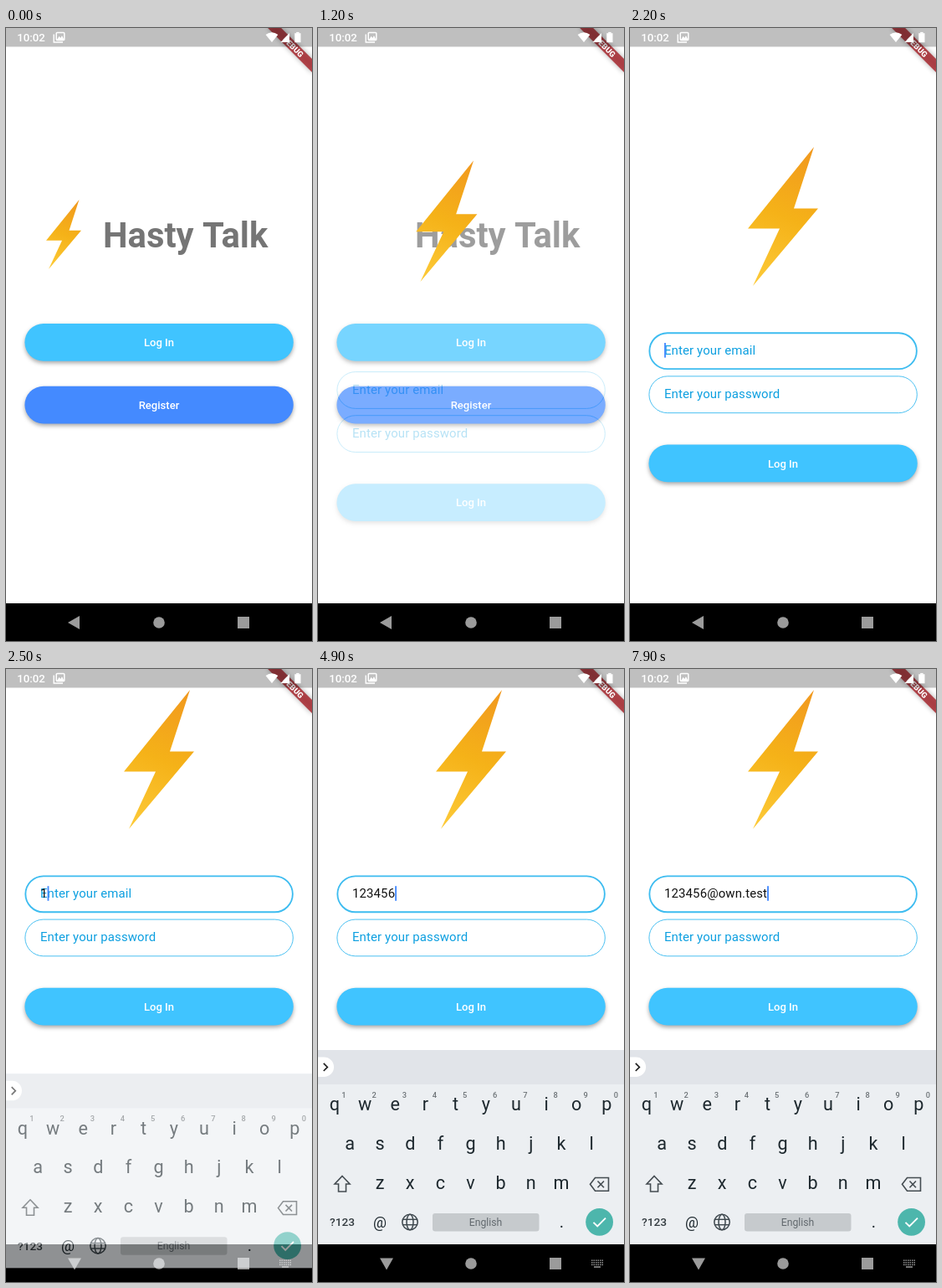
Animation of 366 by 732 pixels, one loop 8 s. Source, as an HTML page with a canvas:

```html
<!DOCTYPE html>
<html lang="en">
<head>
<meta charset="utf-8">
<title>Chat app login</title>
<style>
  html, body { margin: 0; width: 100%; height: 100%; overflow: hidden; background: #fff; }
  canvas { display: block; width: 366px; height: 732px; }
</style>
</head>
<body>
<canvas id="stage"></canvas>
<script>
const W = 366, H = 732, LOOP = 8000;
const SKY = '#40c4ff', BLUE = '#448aff', HINT = '#0c9fe0', GREY = '#9b9b9b', INK = '#1d282e';
const ratio = window.devicePixelRatio || 1;

function prepare(canvas) {
  canvas.width = W * ratio;
  canvas.height = H * ratio;
  const context = canvas.getContext('2d');
  context.scale(ratio, ratio);
  return context;
}
const screen = prepare(document.getElementById('stage'));
const layer = prepare(document.createElement('canvas'));
let g = screen;

// Timeline, in ms
const ROUTE = { start: 1090, length: 233 };
const FOCUS = 2200, RESIZE = 2300;
const KEYBOARD = { start: 2410, length: 150 };
const ADDRESS = '123456@own.test';
// [time, number of characters typed]
const TYPING = [[2500, 1], [2900, 2], [3200, 3], [3700, 4], [4100, 5], [4500, 6], [5300, 7],
  [6400, 8], [6600, 9], [6900, 10], [7300, 11], [7700, 12], [7800, 14], [7900, 15]];
const CARET_OFF = [[5000, 5300], [5850, 6400]];

const clamp = v => Math.max(0, Math.min(1, v));
const progress = (t, span) => clamp((t - span.start) / span.length);
const mix = (a, b, p) => a + (b - a) * p;

function bezier(x1, y1, x2, y2) {
  const at = (a, b, u) => 3 * a * u * (1 - u) ** 2 + 3 * b * u * u * (1 - u) + u ** 3;
  return x => {
    let low = 0, high = 1;
    for (let i = 0; i < 24; i++) {
      const mid = (low + high) / 2;
      if (at(x1, x2, mid) < x) low = mid; else high = mid;
    }
    return at(y1, y2, high);
  };
}
const glide = bezier(.4, 0, .2, 1);
const easeIn = bezier(.42, 0, 1, 1);

function rect(x, y, w, h, color) {
  g.fillStyle = color;
  g.fillRect(x, y, w, h);
}
function round(x, y, w, h, r) {
  g.beginPath();
  g.roundRect(x, y, w, h, r);
}
function disc(x, y, r, color) {
  g.fillStyle = color;
  g.beginPath();
  g.arc(x, y, r, 0, Math.PI * 2);
  g.fill();
}
function trace(points, closed) {
  g.beginPath();
  points.forEach(([x, y]) => g.lineTo(x, y));
  if (closed) g.closePath();
}
function polygon(points, color) {
  trace(points, true);
  g.fillStyle = color;
  g.fill();
}
function stroke(color, width) {
  g.strokeStyle = color;
  g.lineWidth = width;
  g.stroke();
}
function line(points, color, width, closed) {
  trace(points, closed);
  stroke(color, width);
}
function text(label, x, y, size, color, weight = 400, align = 'left', spacing = 0) {
  g.font = `${weight} ${size}px Roboto, sans-serif`;
  g.letterSpacing = spacing + 'px';
  g.textAlign = align;
  g.fillStyle = color;
  g.fillText(label, x, y);
}

// Paints a group on its own layer, then composites it with one opacity.
function group(alpha, dy, paint) {
  if (alpha <= 0) return;
  layer.clearRect(0, 0, W, H);
  g = layer;
  g.save();
  g.translate(0, dy);
  paint();
  g.restore();
  g = screen;
  g.save();
  g.globalAlpha = alpha;
  g.drawImage(layer.canvas, 0, 0, W, H);
  g.restore();
}

function button(label, y, color) {
  g.save();
  g.shadowColor = 'rgba(0,0,0,.34)';
  g.shadowBlur = 5 * ratio;
  g.shadowOffsetY = 2.5 * ratio;
  g.fillStyle = color;
  round(22.4, y, 321.4, 44.7, 22.35);
  g.fill();
  g.restore();
  text(label, 183, y + 27, 13.05, '#fff', 500, 'center');
}

function field(y, focused) {
  const w = focused ? 1.86 : .93;
  round(22.4 + w / 2, y + w / 2, 321.4 - w, 44.7 - w, 22.3);
  stroke('#3dbcf0', w);
}

function bolt(cx, cy, scale) {
  g.save();
  g.translate(cx, cy);
  g.scale(scale, scale);
  const fill = g.createLinearGradient(37, -83, -36, 83);
  fill.addColorStop(0, '#f1981f');
  fill.addColorStop(.5, '#f5b218');
  fill.addColorStop(1, '#fdcb3a');
  polygon([[37, -83], [13, -9.5], [42, -9.5], [-36, 83], [-4, 14.5], [-42, 14.5]], fill);
  g.restore();
}

function welcomePage() {
  rect(0, 0, W, H, '#fff');
  text('Hasty Talk', 116, 261.5, 41.8, '#757575', 700);
  button('Log In', 353, SKY);
  button('Register', 427.7, BLUE);
}

function typed(t) {
  const step = TYPING.filter(([time]) => time <= t).pop();
  return step ? ADDRESS.slice(0, step[1]) : '';
}

function loginPage(t) {
  const top = t >= RESIZE ? 246.5 : 363.3;
  const value = typed(t);
  const focused = t >= FOCUS;
  rect(0, 0, W, H, '#fff');
  field(top, focused);
  field(top + 52.1, false);
  g.globalAlpha = 1 - clamp((t - 2520) / 180);
  text('Enter your email', 41, top + 26.4, 14.93, HINT, 400, 'left', .14);
  g.globalAlpha = 1;
  text('Enter your password', 41, top + 78.5, 14.93, HINT, 400, 'left', .14);
  text(value, 41, top + 26.4, 14.93, '#111', 400, 'left', .14);
  if (focused && !CARET_OFF.some(([from, to]) => t >= from && t < to))
    rect(41 + g.measureText(value).width, top + 12.7, 1.86, 17.6, BLUE);
  button('Log In', top + 134.2, SKY);
}

function banner() {
  g.save();
  g.translate(W, 0);
  g.rotate(Math.PI / 4);
  g.shadowColor = 'rgba(0,0,0,.5)';
  g.shadowBlur = 6 * ratio;
  rect(-37.3, 26.1, 74.6, 11.2, 'rgba(183,28,28,.63)');
  g.shadowColor = 'transparent';
  rect(-37.3, 26.1, 74.6, 11.2, 'rgba(160,45,55,.55)');
  text('DEBUG', 0, 35.1, 9.5, '#fff', 900, 'center');
  g.restore();
}

function statusBar() {
  rect(0, 0, W, 22.4, 'rgba(0,0,0,.25)');
  text('10:02', 13.3, 16.3, 13.2, '#fff', 500);
  line([[57.2, 7.5], [57.2, 17], [68, 17]], '#fff', 1.4);
  round(60.2, 5.6, 9.6, 8.8, 1);
  stroke('#fff', 1.5);
  polygon([[61, 14], [63.6, 9.8], [65.3, 12], [67, 9], [69.5, 14]], '#fff');
  g.fillStyle = '#fff';
  g.beginPath();
  g.moveTo(318, 17);
  g.lineTo(310.6, 8);
  g.quadraticCurveTo(318, 2.5, 325.4, 8);
  g.fill();
  polygon([[328.5, 17], [339, 17], [339, 6]], '#fff');
  rect(345.3, 6.2, 7.2, 11, '#fff');
  rect(347.2, 4.9, 3.4, 1.5, '#fff');
}

function navBar(open) {
  rect(0, 687, W, 45, '#000');
  polygon(open ? [[74, 703.5], [90, 703.5], [82, 717.5]] : [[74, 710], [88, 702], [88, 718]], GREY);
  disc(183, 710, 6.8, GREY);
  rect(277, 703, 14, 14, GREY);
  if (!open) return;
  for (let row = 0; row < 3; row++)
    for (let col = 0; col < 6; col++)
      rect(327 + col * 2.5, 705.5 + row * 2.6, 1.5, 1.4, GREY);
  rect(330, 713.3, 8, 1.5, GREY);
}

function letters(row, x, y) {
  [...row].forEach((key, i) => text(key, x + i * 36.15, y, 21.6, INK, 400, 'center'));
}

function keyboard() {
  rect(0, 455, W, 232, '#eceff2');
  rect(0, 455, W, 41, '#e1e4e9');
  g.fillStyle = '#fff';
  round(-12, 463.5, 31, 23.5, 11.75);
  g.fill();
  line([[6.7, 470.8], [11.3, 475.4], [6.7, 480]], '#222', 1.7);

  letters('qwertyuiop', 20, 527.3);
  letters('asdfghjkl', 38, 573.5);
  letters('zxcvbnm', 74, 620.5);
  [...'1234567890'].forEach((n, i) => text(n, 31 + i * 36.15, 512, 9.3, '#6d7377', 500, 'center'));

  line([[29, 605.5], [38, 615], [33.5, 615], [33.5, 624], [24.5, 624], [24.5, 615], [20, 615]], '#444c51', 1.6, true);
  line([[325.5, 615.3], [331.5, 607.5], [347.5, 607.5], [347.5, 623.2], [331.5, 623.2]], '#444c51', 1.6, true);
  line([[334.5, 611.5], [342, 619.2]], '#444c51', 1.6);
  line([[342, 611.5], [334.5, 619.2]], '#444c51', 1.6);

  text('?123', 29, 665.3, 13.6, '#333b40', 500, 'center');
  text('@', 74, 667, 17.8, INK, 400, 'center');
  for (const rx of [9.2, 4]) {
    g.beginPath();
    g.ellipse(110, 660.5, rx, 9.2, 0, 0, Math.PI * 2);
    stroke('#3d474d', 1.5);
  }
  for (const dy of [-3.2, 3.2])
    line([[101.5, 660.5 + dy], [118.5, 660.5 + dy]], '#3d474d', 1.4);
  g.fillStyle = '#c6cacd';
  round(137, 650, 127.5, 21.5, 3);
  g.fill();
  text('English', 200.5, 665, 12.2, '#62696e', 400, 'center');
  text('.', 291.3, 667, 20, INK, 400, 'center');
  disc(336.6, 660.3, 16.4, '#4db6ac');
  line([[329.5, 660.8], [334.2, 665.5], [344, 655.6]], '#fff', 1.9);
}

function draw(t) {
  const route = progress(t, ROUTE);
  const flight = glide(route);
  if (route < 1) {
    welcomePage();
    group(easeIn(route), (1 - flight) * H / 4, () => loginPage(t));
  } else {
    loginPage(t);
  }
  bolt(mix(69, 183, flight), t >= RESIZE ? 108 : mix(246.5, 225, flight), mix(.5, 1, flight));
  banner();
  statusBar();
  navBar(t >= KEYBOARD.start);
  const shown = progress(t, KEYBOARD);
  group(shown, 72 * (1 - shown), keyboard);
}

const began = performance.now();
function tick(now) {
  draw(Math.max(0, now - began) % LOOP);
  requestAnimationFrame(tick);
}
draw(0);
requestAnimationFrame(tick);
</script>
</body>
</html>
```
